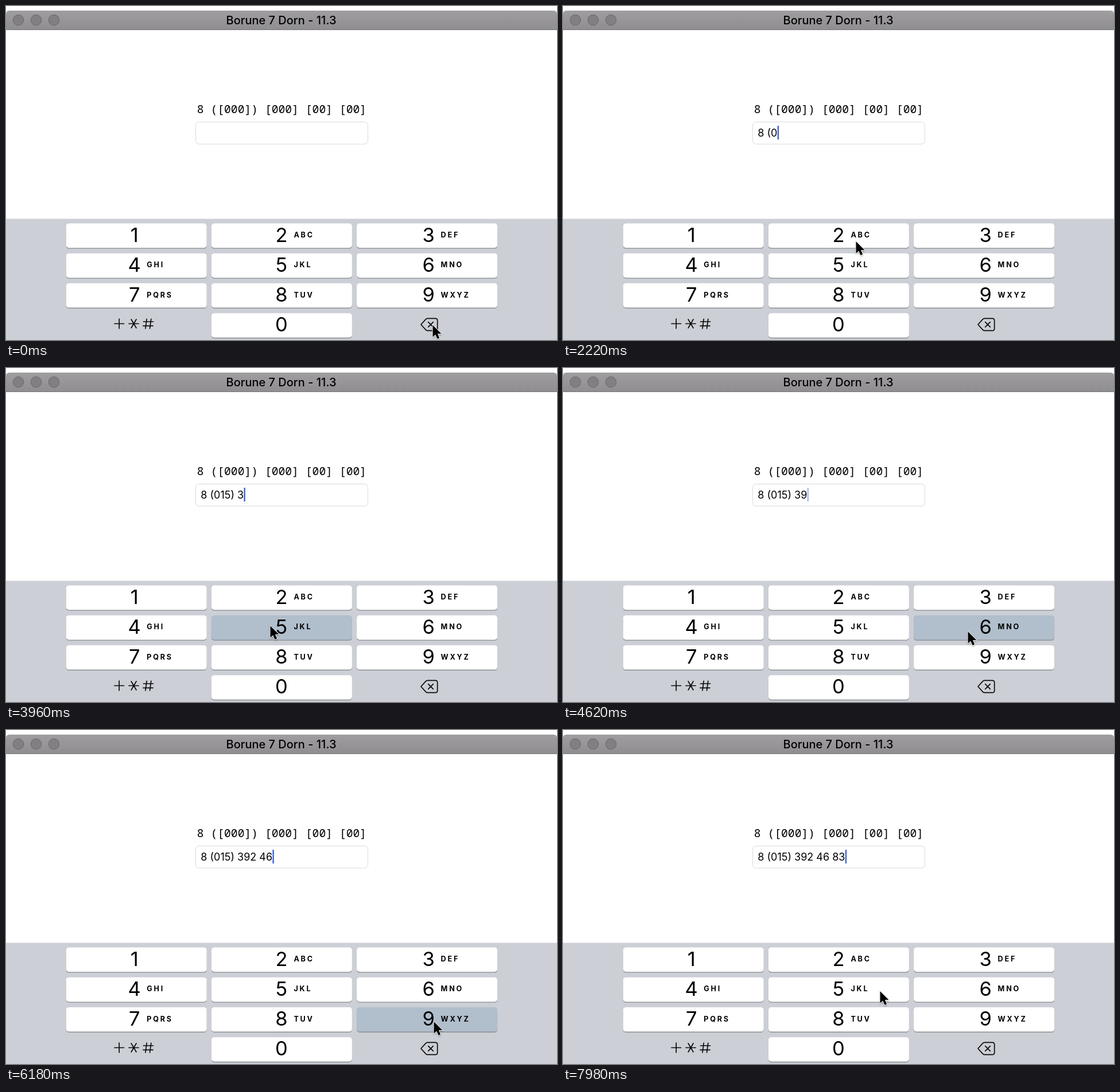
Write an HTML page that moves like this. It is 960 px wide and 583 px high and loops after 8000 ms.

```html
<!DOCTYPE html>
<html lang="en">
<head>
<meta charset="utf-8">
<title>Masked input</title>
<style>
  html, body { margin: 0; width: 100%; height: 100%; overflow: hidden; background: #fff; }
  svg { display: block; width: 100%; height: 100%; font-family: Inter, Roboto, sans-serif; }
  text { white-space: pre; }
  .line { fill: none; stroke: #0a0a0a; stroke-width: 1.7; stroke-linecap: round; stroke-linejoin: round; }
  .digit { font-size: 34.5px; text-anchor: middle; }
  .letters { font-size: 12.6px; font-weight: 700; letter-spacing: 2.8px; }
  .title { font-size: 20px; font-weight: 500; text-anchor: middle; }
  .mask { font: 500 19.7px "Noto Sans Mono", "DejaVu Sans Mono", monospace; }
</style>
</head>
<body>
<svg viewBox="0 0 960 583">
  <defs>
    <linearGradient id="bar" x2="0" y2="1">
      <stop stop-color="#a09ea1"/><stop offset="1" stop-color="#8f8d90"/>
    </linearGradient>
    <filter id="soft" x="-50%" y="-50%" width="200%" height="200%">
      <feDropShadow dx="0" dy="1.5" stdDeviation="1.2" flood-opacity=".35"/>
    </filter>
  </defs>

  <path d="M0 42V14Q0 8 6 8H954Q960 8 960 14V42Z" fill="url(#bar)"/>
  <path d="M0 41.5H960" stroke="#77767a"/>
  <g fill="#817f82" stroke="#6b696c">
    <circle cx="21.5" cy="24.5" r="9.3"/><circle cx="52.5" cy="24.5" r="9.3"/><circle cx="83.5" cy="24.5" r="9.3"/>
  </g>
  <text class="title" x="479.5" y="32.3">Borune 7 Dorn - 11.3</text>

  <text class="mask" x="332.8" y="186.5">8 ([000]) [000] [00] [00]</text>
  <rect x="330.5" y="202.5" width="300" height="38.5" rx="6" fill="#fff" stroke="#dadadc"/>
  <text id="value" x="339.3" y="227.7" font-size="18"></text>
  <rect id="caret" y="209" width="2.5" height="24" fill="#4169d8"/>

  <path d="M0 371.6H960V583H0Z" fill="#cccfd5"/>
  <g id="keys"></g>
  <path class="line" d="M189 554.5H205.5M197.2 546.2V562.8
    M214 554.5H231M218.2 547L227 562M227 547L218.2 562
    M239.5 551H256.5M239 558.3H256M245.2 546.3L243 562.8M252.8 546.3L250.6 562.8"/>
  <path class="line" d="M723 556L731.5 546.6Q732.8 545.3 734.5 545.3H748Q751.7 545.3 751.7 549V563Q751.7 566.7 748 566.7H734.5Q732.8 566.7 731.5 565.4Z
    M735.7 551.7L744.3 560.3M744.3 551.7L735.7 560.3"/>

  <g id="pointer">
    <path transform="translate(.5 -1) scale(.9)" d="M0 0V23L5.2 18.2L9 26.6L13 24.9L9.4 16.8H16.6Z"
      stroke="#fff" stroke-width="1.8" stroke-linejoin="round" paint-order="stroke" filter="url(#soft)"/>
  </g>
</svg>
<script>
const $ = id => document.getElementById(id);
const LOOP = 8000, STEP = 60, PRESS = 120;
const LETTERS = ['', 'ABC', 'DEF', 'GHI', 'JKL', 'MNO', 'PQRS', 'TUV', 'WXYZ'];
const NUMBER = '8 (015) 392 46 83';

// Where the pointer rests and when: the second to eleventh stops tap keys 1 to 9 and 0
const STOPS = [
  [660, 743, 558], [1800, 325, 404], [2280, 510, 412], [2640, 666, 418], [3480, 300, 455],
  [3900, 460, 451], [4620, 705, 461], [5160, 289, 507], [5580, 535, 505], [6120, 745, 510],
  [6780, 559, 551], [7140, 559, 551], [7560, 712, 488], [8040, 552, 457]
].map(([time, x, y]) => ({ time, x, y, arrive: time - 60, leave: time + 240 }));
const TAPS = STOPS.slice(1, 11);

function makeKey(i) {
  const slot = i < 9 ? i : 10, col = slot % 3, row = Math.floor(slot / 3);
  const x = 104.7 + col * 253.2, y = 379.6 + row * 52.2, cx = 223.7 + col * 256.2;
  return `
    <rect x="${x}" y="${y + 1.4}" width="245" height="42.6" rx="5" fill="#888b90"/>
    <rect id="key${i}" x="${x}" y="${y}" width="245" height="42.6" rx="5"/>
    <text class="digit" x="${cx}" y="${y + 32}">${(i + 1) % 10}</text>
    <text class="letters" x="${cx + 21.5}" y="${y + 24.5}">${LETTERS[i] || ''}</text>`;
}
$('keys').innerHTML = TAPS.map((_, i) => makeKey(i)).join('');

function pointerAt(t) {
  const k = Math.max(1, STOPS.findIndex(s => s.leave > t));
  const a = STOPS[k - 1], b = STOPS[k];
  const u = Math.min(1, Math.max(0, (t - a.leave) / (b.arrive - a.leave)));
  const e = u * u * (3 - 2 * u);
  return [a.x + (b.x - a.x) * e, a.y + (b.y - a.y) * e];
}

// The fixed prefix appears with the first typed digit
const typed = n => n ? NUMBER.match(`^8 \\((\\D*\\d){${n}}`)[0] : '';

// Solid, fade out, hidden, fade in
function blink(age) {
  if (age < 0) return 0;
  const p = age % 1020;
  return Math.max(0, Math.min(1, (690 - p) / 200), (p - 900) / 120);
}

function draw(t) {
  const count = TAPS.filter(tap => tap.time + PRESS <= t).length;
  const since = count ? TAPS[count - 1].time + PRESS : 45;
  $('value').textContent = typed(count);
  $('caret').setAttribute('x', 339.5 + (count && $('value').getComputedTextLength()));
  $('caret').setAttribute('opacity', blink(t - since));
  TAPS.forEach(({ time }, i) =>
    $('key' + i).setAttribute('fill', t >= time && t < time + PRESS ? '#b1becc' : '#fff'));
  $('pointer').setAttribute('transform', `translate(${pointerAt(t)})`);
}

function frame() {
  const t = performance.now() % LOOP;
  draw(Math.floor(t / STEP) * STEP);
  requestAnimationFrame(frame);
}
frame();
</script>
</body>
</html>
```
